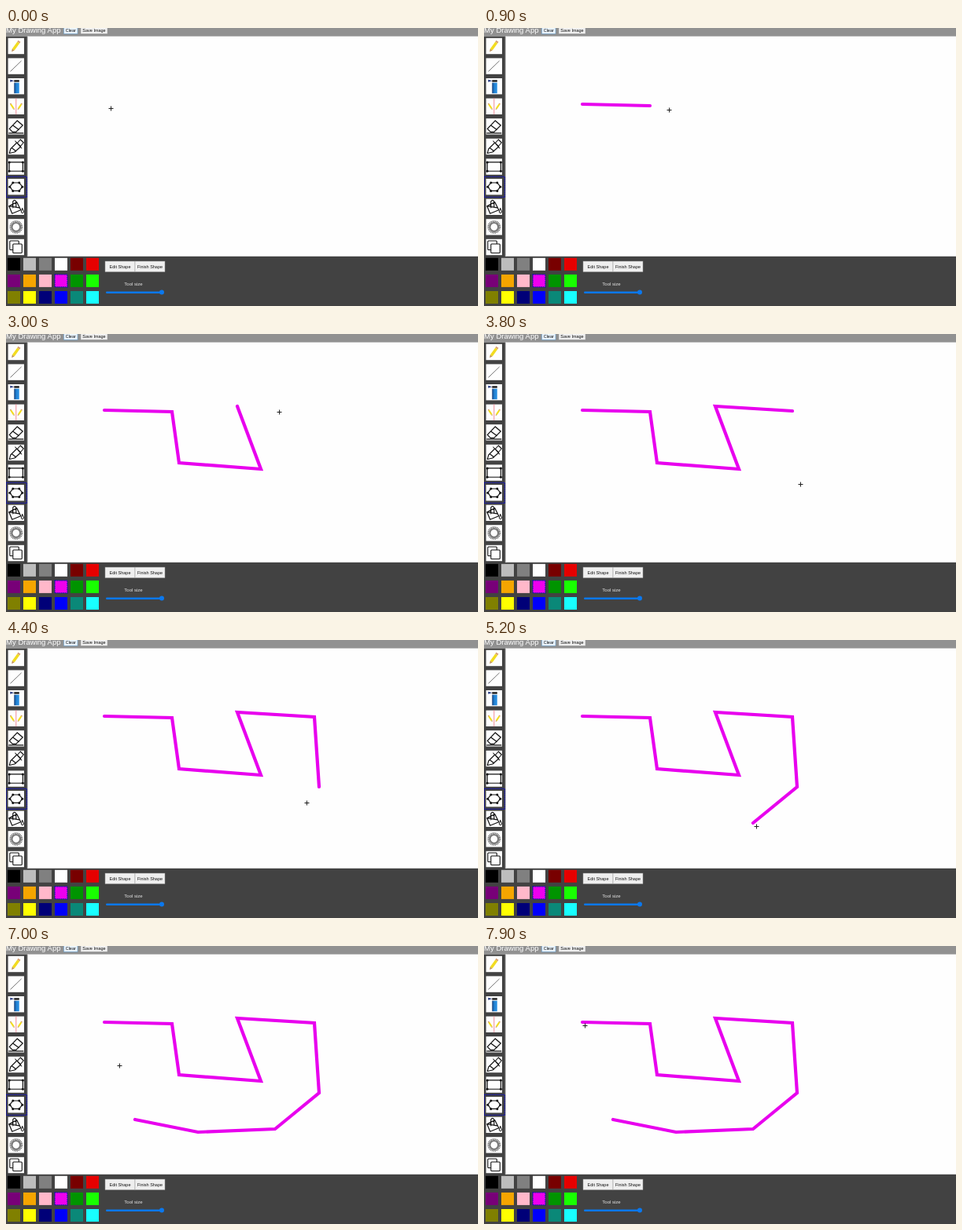
Animation of 600x354 px, one loop 8 s. Source, as an HTML page:

```html
<!DOCTYPE html>
<html lang="en">
<head>
<meta charset="utf-8">
<title>Drawing app</title>
<style>
  html, body { margin: 0; width: 100%; height: 100%; overflow: hidden; background: #424242; }
  svg { display: block; width: 100vw; height: 100vh; }
  text { font-family: "Liberation Sans", Arial, sans-serif; }
</style>
</head>
<body>
<svg viewBox="0 0 600 354">
  <defs>
    <linearGradient id="can" x2="1"><stop stop-color="#123a78"/><stop offset=".4" stop-color="#1f7fd0"/><stop offset="1" stop-color="#2f95e6"/></linearGradient>
    <linearGradient id="shade" x2="1"><stop stop-color="#777"/><stop offset="1" stop-color="#fefefe"/></linearGradient>
  </defs>
  <rect width="600" height="354" fill="#424242"/>
  <rect width="600" height="11" fill="#919191"/>
  <rect x="27" y="10.6" width="573" height="280.2" fill="#fefefe"/>
  <rect x="26.5" y="10.6" width="2" height="280.2" fill="url(#shade)"/>
  <text y="6.2" font-size="9.55" fill="#fff">My Drawing App</text>

  <g id="buttons" font-size="5.5" text-anchor="middle"></g>
  <g id="tools" fill="none" stroke="#111" stroke-linecap="round" stroke-linejoin="round"></g>
  <g id="swatches"></g>

  <text x="162" y="328" font-size="6" fill="#e4e4e4" text-anchor="middle">Tool size</text>
  <rect x="127" y="335.4" width="73" height="2.6" rx="1.3" fill="#0b78ee"/>
  <circle cx="198" cy="336.6" r="3" fill="#0b78ee"/>

  <polyline id="shape" fill="none" stroke="#e800ee" stroke-width="4.2" stroke-linecap="round" stroke-miterlimit="10"/>
  <path id="cursor" d="M-3 0H3M0-3V3" stroke="#222"/>
</svg>
<script>
const $ = id => document.getElementById(id);

function button(label, x, y, w, h, fill = '#efefef', edge = '#999') {
  return `<rect x="${x}" y="${y}" width="${w}" height="${h}" fill="${fill}" stroke="${edge}" stroke-width=".5"/>
    <text x="${x + w / 2}" y="${y + h / 2 + 2}" fill="#111">${label}</text>`;
}
$('buttons').innerHTML =
  button('Clear', 73.5, -1, 17.5, 8.3, '#e8f2fb', '#5b9bd0') +
  button('Save Image', 95, -1, 34, 8.3) +
  button('Edit Shape', 126, 297, 38, 13.5) +
  button('Finish Shape', 164, 297, 38, 13.5);

// Icons are drawn around their own centre
const pencil = '<path d="M-3.5 4.5L3-4.5" stroke="#f2dc20" stroke-width="3.6" stroke-linecap="butt"/><path d="M3-4.5L4.2-6.3" stroke="#d8a070" stroke-width="3.6" stroke-linecap="butt"/><path d="M-5.6 7.2L-5 3.5L-2.2 5.6Z" fill="#c09050" stroke="none"/>';
const smallPencil = flip => `<g transform="translate(${5 * flip} 0) scale(${.55 * flip} .6)">${pencil}</g>`;
const nodes = pts => `<path d="M${pts.join('L')}Z" stroke-width="1.2"/>` +
  pts.map(([x, y]) => `<circle cx="${x}" cy="${y}" r="1.5" fill="#111" stroke="none"/>`).join('');
const ring = (n, rx, ry, turn) => Array.from({ length: n }, (_, i) => {
  const a = (i + turn) / n * 2 * Math.PI;
  return [rx * Math.cos(a), ry * Math.sin(a)];
});
const square = (x, y) => `<rect x="${x}" y="${y}" width="11.5" height="11.5" rx="1" fill="#fefefe" stroke-width="1.1"/>`;

const icons = [
  pencil,
  '<path d="M-7 6.5L6.5-6.5" stroke="#555" stroke-width=".8"/>',
  '<path d="M-2.5-4.5H4V9H-2.5Z" fill="url(#can)" stroke="none"/><path d="M-2.5-5.5H4V-8H-2.5Z" fill="#222" stroke="none"/><path d="M-2.5-7L-7.5-8.5V-5.5Z" fill="#1b2f7a" stroke="none"/>',
  '<path d="M0-10V10" stroke="#f07c8c" stroke-width=".9"/>' + smallPencil(-1) + smallPencil(1),
  '<path d="M-8.5 3L1.5-7.5L8.5-1.5L0 7H-4.5ZM-4-1.5L3.5 4M-9 8.5H9" stroke-width="1.3"/>',
  '<path d="M-8.5 8.5L-7 3L1-5L6 0L-2 7ZM-1-7L7 2M2-5L5.5-9L9.5-5L6-1M-5 2l5 4" stroke-width="1.1"/>',
  nodes(ring(4, 12.2, 8, .5)),
  nodes(ring(6, 8, 6, 0)),
  '<path d="M-9-1L1-6L6 4L-5 8.5ZM-8-1L4 1M-4 1V-7Q-2-10 0-7V0" stroke-width="1.2"/><path d="M8 2Q11 7.5 8 8Q5 7.5 8 2Z"/>',
  '<circle r="7.4" stroke="#555" stroke-width="2" stroke-dasharray="1 .9" stroke-linecap="butt"/><circle r="5.4" stroke="#777" stroke-width="2.2"/>',
  square(-8, -8) + square(-4, -4)
];
const dotted = 'stroke="#1414a8" stroke-width="1.3" stroke-dasharray="1.6 .8" stroke-linecap="butt"';
$('tools').innerHTML = icons.map((icon, i) => `<g transform="translate(12.8 ${23 + i * 25.6})">
  ${i === 7 ? `<rect x="-12.4" y="-12.8" width="26" height="26" ${dotted}/>` : ''}
  <rect x="-10.2" y="-10.2" width="20.4" height="20.4" fill="#fefefe" stroke="none"/>${icon}</g>`).join('');

const colours = ('#000 #bdbdbd #808080 #fff #780000 #e60000 ' +
  '#780078 #f5a500 #ffb8ca #ee00ee #009400 #18ff00 ' +
  '#808000 #ffff00 #000078 #0000fa #0a8878 #18ffff').split(' ');
$('swatches').innerHTML = colours.map((c, i) => {
  const x = 2 + i % 6 * 20, y = 292.8 + Math.floor(i / 6) * 21.1;
  return `<rect x="${x}" y="${y}" width="16" height="16" fill="${c}" ${i === 9 ? dotted : ''}/>`;
}).join('');

// Where the pointer stops and when; it clicks at every stop not marked as a pass
const PASS = true;
const stops = [
  [129, 98, 0, PASS], [125, 97, 200], [211, 99, 700], [231, 100, 1000, PASS],
  [220, 164, 1500], [324, 172, 2000], [294, 92, 2700], [392, 98, 3300],
  [398, 187, 3900], [342, 233, 5100], [244, 237, 5800], [164, 221, 6400],
  [124, 97, 7500, PASS]
];
const corners = stops.filter(s => !s[3]);

// Rests for 100 ms on either side of each stop, eases in between
function pointer(t) {
  const i = stops.findIndex(s => t < s[2]);
  const [x1, y1, t1] = stops.at(i);
  const [x0, y0, t0] = i > 0 ? stops[i - 1] : stops.at(-1);
  const u = Math.min(1, Math.max(0, (t - t0 - 100) / (t1 - t0 - 200 || 1)));
  const k = i < 0 ? 1 : t1 - t0 <= 200 ? Math.min(1, (t - t0) / 100) : u * u * (3 - 2 * u);
  return [x0 + (x1 - x0) * k, y0 + (y1 - y0) * k].map(v => Math.floor(v + 4) + .5);
}

function draw(t) {
  const done = corners.filter(c => t >= c[2]);
  $('shape').setAttribute('points', done.length > 1 ? done.map(c => c.slice(0, 2)).join(' ') : '');
  $('cursor').setAttribute('transform', `translate(${pointer(t)})`);
}

const start = performance.now();
function tick() {
  const t = (performance.now() - start) % 8000;
  draw(Math.floor(t / 100) * 100);
  requestAnimationFrame(tick);
}
tick();
</script>
</body>
</html>
```
